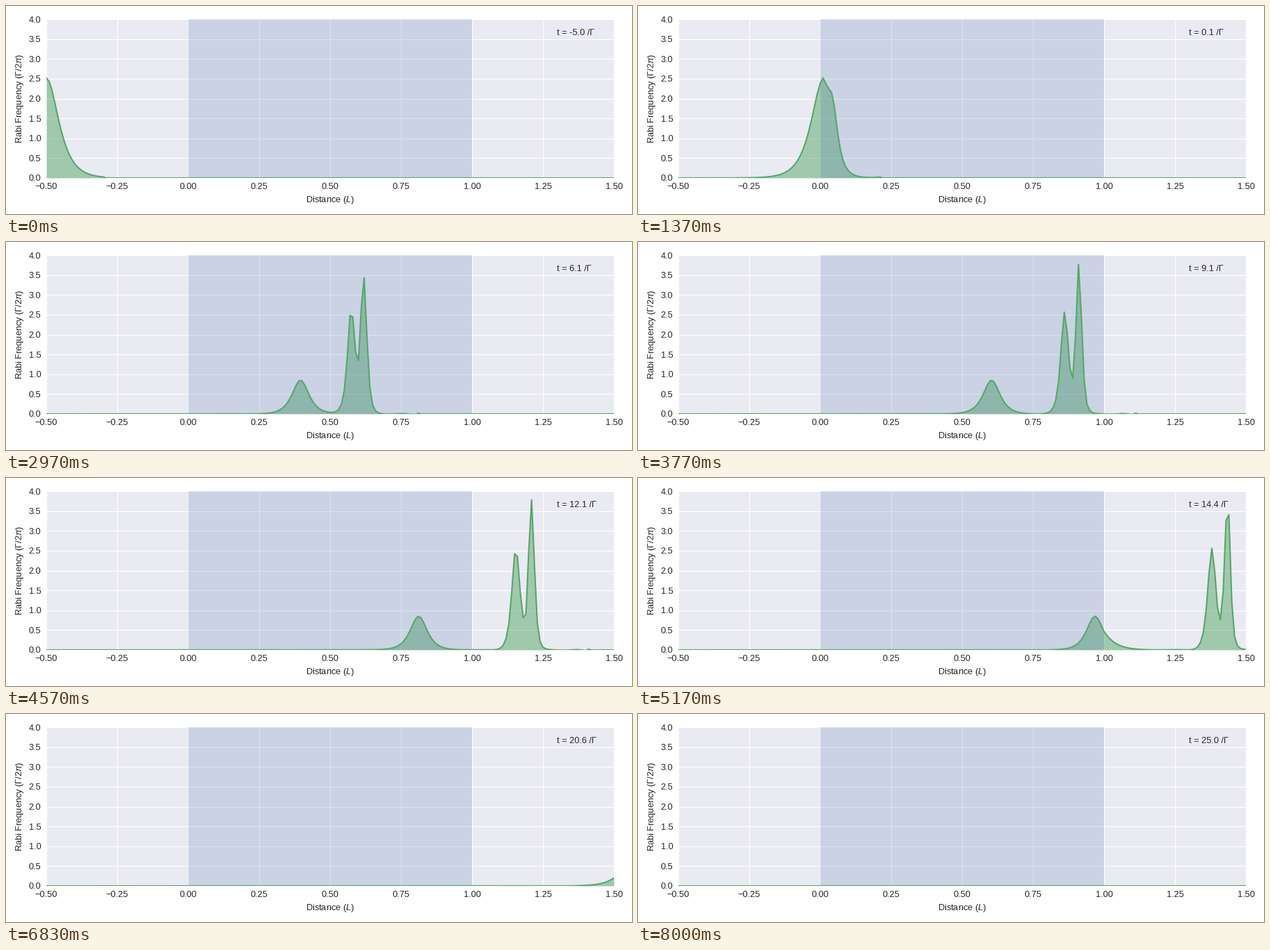
A matplotlib script for the animation above (8060 ms loop, 900x300 px).

```python
import matplotlib.pyplot as plt
import numpy as np
from matplotlib.animation import FuncAnimation

DPI = 100
PX = 72 / DPI                       # points per pixel
INK, GREEN, BLUE, PANEL = "#262626", "#55A868", "#4C72B0", "#EAEAF2"

plt.rcParams.update({
    "font.family": "Liberation Sans",
    "font.size": 12.7 * PX,
    "text.color": INK,
    "mathtext.fontset": "custom",
    "mathtext.rm": "Liberation Sans",
    "mathtext.it": "Liberation Sans:italic",
})

# Pulse and medium
C = 0.1                             # speed of light, L * Gamma
WIDTH = 1 / 2.6339157938            # sech with unit FWHM
PEAK = 3 / (np.pi * WIDTH)          # area of 6 pi
COUPLING = 10 * np.pi
DT, TAU0, N_TAU = 0.1, -2.0, 121
DX, SUBSTEPS = 0.01, 4

tau = TAU0 + DT * np.arange(N_TAU)
x = np.linspace(-0.5, 1.5, 201)


def slope(omega):
    """Resonant two-level response: d(omega)/dz = -k sin(pulse area so far)."""
    area = np.zeros_like(omega)
    area[1:] = np.cumsum(omega[1:] + omega[:-1]) * DT / 2
    return -COUPLING * np.sin(area)


def step(omega, h):
    k1 = slope(omega)
    k2 = slope(omega + h / 2 * k1)
    k3 = slope(omega + h / 2 * k2)
    k4 = slope(omega + h * k3)
    return omega + h / 6 * (k1 + 2 * k2 + 2 * k3 + k4)


def propagate():
    """Field at every x, as a function of retarded time."""
    omega = 2 * np.pi * PEAK / np.cosh(tau / WIDTH)
    rows = []
    for pos in x:
        if 1e-6 < pos < 1 + 1e-6:
            for _ in range(SUBSTEPS):
                omega = step(omega, DX / SUBSTEPS)
        rows.append(omega / (2 * np.pi))
    return np.array(rows)


field = propagate()
row = np.arange(x.size)


def profile(t):
    """Field along x at lab time t, by cubic interpolation in retarded time."""
    s = (t - x / C - TAU0) / DT
    inside = (s > -1e-6) & (s < N_TAU - 1 + 1e-6)
    j = np.clip(np.floor(s), 0, N_TAU - 2).astype(int)
    u = np.clip(s - j, 0, 1)
    a, b, c, d = (field[row, np.clip(j + k, 0, N_TAU - 1)]
                  for k in (-1, 0, 1, 2))
    value = b + u / 2 * (c - a + u * (2 * a - 5 * b + 4 * c - d
                                      + u * (3 * (b - c) + d - a)))
    return np.where(inside, value, 0.0)


# Stage
fig = plt.figure(figsize=(9, 3), dpi=DPI, facecolor="white")
ax = fig.add_axes([58 / 900, 52 / 300, 816 / 900, 229 / 300], facecolor=PANEL)
ax.set(xlim=(-0.5, 1.5), ylim=(0, 4),
       xticks=np.arange(-0.5, 1.51, 0.25), yticks=np.arange(0, 4.1, 0.5))
ax.set_axisbelow(True)
ax.grid(color="white", linewidth=1.1 * PX)
ax.tick_params(length=0, pad=7.5 * PX, labelcolor=INK)
for spine in ax.spines.values():
    spine.set_visible(False)

fig.text(466 / 900, 17 / 300, "Distance ($L$)", ha="center", va="baseline")
fig.text(23.5 / 900, 167 / 300, r"Rabi Frequency ($\Gamma/2\pi$)", rotation=90,
         rotation_mode="anchor", ha="center", va="baseline")

fill = ax.fill_between(x, 0 * x, color=GREEN, alpha=0.5, linewidth=0, zorder=1)
ax.axvspan(0, 1, color=BLUE, alpha=0.2, linewidth=0, zorder=1.1)
line, = ax.plot(x, 0 * x, color=GREEN, linewidth=2.1 * PX, zorder=2)
clock = ax.text(0.9, 0.9, "", transform=ax.transAxes)

# Timing: 30 pictures a second, the last one held
TICK, LOOP, LAST = 20, 8060, 240


def draw(n):
    ms = n * TICK + TICK / 2
    t = -5 + min(int((ms + 5) * 0.03), LAST) / 8
    y = profile(t)
    line.set_ydata(y)
    outline = np.column_stack([np.r_[x[0], x, x[-1]], np.r_[0, y, 0]])
    fill.set_verts([outline])
    clock.set_text(f"t = {t:.1f} /Γ")
    return fill, line, clock


anim = FuncAnimation(fig, draw, frames=LOOP // TICK, interval=TICK,
                     repeat=True, repeat_delay=0)
plt.show()
```
